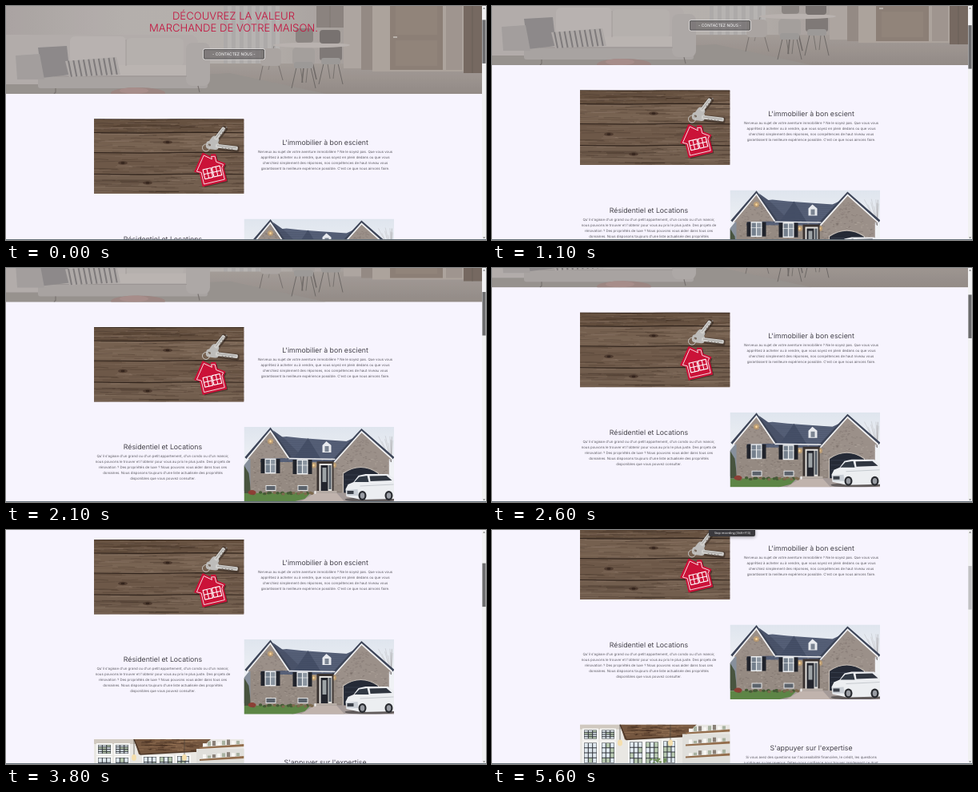
Write an HTML page with a canvas that moves like this. It is 600 by 293 pixels and loops after 5700 ms.

```html
<!DOCTYPE html>
<html lang="fr">
<head>
<meta charset="utf-8">
<title>Immobilier</title>
<style>
html, body { margin: 0; width: 100%; height: 100%; overflow: hidden; background: #f7f4fe; }
canvas { display: block; width: 600px; height: 293px; }
</style>
</head>
<body>
<canvas id="stage" width="600" height="293"></canvas>
<script>
const ctx = document.getElementById('stage').getContext('2d');
const LOOP = 5700, STEP = 100, ZOOM = 0.3125;
const PIC_W = 187.5, PIC_H = 93.5;
const scrollKeys = [[0, 0], [600, 20], [1400, 45.5], [2100, 67.5], [3100, 104],
  [3800, 129.5], [4200, 142.5], [4600, 148]];

let seed = 1;
const rnd = () => (seed = seed * 16807 % 2147483647) / 2147483647;
const gray = (v, warm = 0) => `rgb(${v + warm},${v},${v - warm})`;

function box(color, x, y, w, h) {
  ctx.fillStyle = color;
  ctx.fillRect(x, y, w, h);
}

function trace(pts, closed) {
  ctx.beginPath();
  for (let i = 0; i < pts.length; i += 2) ctx.lineTo(pts[i], pts[i + 1]);
  if (closed) ctx.closePath();
}

function poly(color, ...pts) {
  trace(pts, true);
  ctx.fillStyle = color;
  ctx.fill();
}

function line(color, width, ...pts) {
  trace(pts, false);
  ctx.strokeStyle = color;
  ctx.lineWidth = width;
  ctx.stroke();
}

function oval(color, x, y, rx, ry, tilt = 0) {
  ctx.beginPath();
  ctx.ellipse(x, y, rx, ry, tilt, 0, 7);
  ctx.fillStyle = color;
  ctx.fill();
}

function round(color, x, y, w, h, r) {
  ctx.beginPath();
  ctx.roundRect(x, y, w, h, r);
  ctx.fillStyle = color;
  ctx.fill();
}

function fade(x0, y0, x1, y1, ...colors) {
  const g = ctx.createLinearGradient(x0, y0, x1, y1);
  colors.forEach((c, i) => g.addColorStop(i / (colors.length - 1), c));
  return g;
}

// Font sizes are those of a page 1920 px wide.
function text(str, x, y, size, color, weight = 400, family = 'Inter') {
  ctx.save();
  ctx.translate(x, y);
  ctx.scale(ZOOM, ZOOM);
  ctx.font = `${weight} ${size}px ${family}, sans-serif`;
  ctx.textRendering = 'geometricPrecision';
  ctx.textAlign = 'center';
  ctx.fillStyle = color;
  ctx.fillText(str, 0, 0);
  ctx.restore();
}

function article(x, y, title, lines) {
  text(title, x, y + 3.2, 28, '#45434a');
  lines.forEach((s, i) => text(s, x, y + 13 + i * 7, 14, '#5c5a62'));
}

function picture(x, y, draw) {
  ctx.save();
  ctx.translate(x, y);
  ctx.beginPath();
  ctx.rect(0, 0, PIC_W, PIC_H);
  ctx.clip();
  draw();
  ctx.restore();
}

function chair(x, y, color) {
  const leg = '#6b6764';
  line(leg, 1, x + 5, y + 25, x - 1, y + 51);
  line(leg, 1, x + 23, y + 25, x + 29, y + 51);
  line(leg, 0.8, x + 10, y + 25, x + 13, y + 44);
  line(leg, 0.8, x + 19, y + 25, x + 17, y + 44);
  round(color, x, y, 28, 21, [5, 5, 3, 3]);
  round(gray(158, 2), x + 2, y + 18, 24, 8, 3);
}

function hero() {
  ctx.save();
  ctx.beginPath();
  ctx.rect(0, 0, 595, 110);
  ctx.clip();
  box(fade(0, 0, 595, 0, '#b0aaa8', '#bcb7b4', '#bdb8b4', '#a9a29e', '#a39a94'), 0, 0, 595, 110);
  // Curtains
  for (let i = 0; i < 14; i++) box(gray(i % 2 ? 188 : 178, 2), 272 + i * 5, 0, 5, 74);
  // Floor
  box(fade(0, 68, 0, 110, '#aaa39e', '#968e89'), 0, 72, 595, 38);
  poly('#9b9692', 0, 98, 280, 84, 400, 110, 0, 110);

  // Sofa
  round('#b9b4b2', -10, 36, 250, 62, 10);
  round('#c0bbb8', 80, 38, 70, 40, 6);
  round('#bdb8b5', 150, 40, 72, 36, 6);
  round('#c2bdba', 60, 74, 180, 15, 4);
  round('#aea9a7', 40, 87, 212, 16, 3);
  round('#b4afad', 225, 46, 30, 54, 8);
  line('#9c9795', 0.8, 60, 88, 226, 88);
  line('#a39e9b', 0.8, 150, 42, 150, 75);
  line('#77726f', 1.2, 62, 103, 62, 108, 60, 110);
  line('#77726f', 1.2, 240, 100, 242, 108);
  // Cushions
  poly('#8f8c8d', 40, 52, 76, 50, 80, 86, 45, 90);
  poly('#a8a4a3', 12, 62, 42, 60, 48, 92, 14, 92);
  poly('#b5b0ae', 74, 69, 138, 64, 143, 86, 79, 89);
  for (let i = 0; i < 10; i++) line('#7f7c7d', 2, 78 + i * 6.3, 68.6 - i * 0.45, 82 + i * 6.3, 88.6 - i * 0.3);
  // Coffee table
  oval('#a08884', 165, 109, 34, 7);
  oval('#ad918d', 160, 106, 18, 4);

  // Cupboards and kitchen opening
  box('#8d8580', 388, 0, 34, 27);
  line('#7b7470', 0.8, 405, 0, 405, 27);
  box('#b4aca6', 422, 0, 22, 78);
  box('#978d86', 444, 0, 14, 80);
  // Door
  box('#b3a9a2', 458, 0, 116, 82);
  box('#8e8076', 480, 0, 66, 80);
  box('#94867b', 487, 0, 52, 36);
  box('#94867b', 487, 43, 52, 32);
  box('#c0b9b2', 484, 38, 5, 2);
  box('#a49a93', 550, 0, 20, 80);
  box('#75685f', 572, 0, 23, 84);
  line('#675c54', 1, 583, 0, 583, 84);
  // Dining corner
  line('#6f6a67', 1.6, 376, 40, 370, 96);
  line('#6f6a67', 1.6, 376, 40, 388, 92);
  chair(392, 47, '#7f7a77');
  chair(358, 52, '#aaa5a2');
  round('#8d8784', 362, 28, 22, 18, 4);
  oval('#c1bbb7', 382, 49, 48, 3.2);
  round('#77726f', 392, 30, 26, 17, 4);
  line('#7f7a76', 0.8, 335, 50, 328, 80);
  round('#b0aba7', 318, 53, 26, 22, 5);
  line('#77716e', 1, 321, 75, 317, 93);
  line('#77716e', 1, 341, 75, 346, 93);
  box('rgba(120,116,118,.12)', 0, 0, 595, 110);
  ctx.restore();

  text('DÉCOUVREZ LA VALEUR', 284.5, 16.6, 42, '#c4103c', 300);
  text('MARCHANDE DE VOTRE MAISON.', 284.5, 32.2, 42, '#c4103c', 300);
  round('rgba(90,87,88,.55)', 246.5, 53.7, 77, 13.2, 2);
  ctx.lineWidth = 1;
  ctx.strokeStyle = '#e2dfdf';
  ctx.stroke();
  ctx.beginPath();
  ctx.roundRect(247.4, 54.6, 75.2, 11.4, 1.5);
  ctx.lineWidth = 0.7;
  ctx.strokeStyle = '#444';
  ctx.stroke();
  text('- CONTACTEZ NOUS -', 284.8, 62, 16, '#fff');
}

function keyShape(x, y, angle, length) {
  ctx.save();
  ctx.translate(x, y);
  ctx.rotate(angle);
  round('rgba(35,25,20,.45)', -6, -3, length + 6, 8, 3);
  round('#bdbcba', -8, -5, 16, 10, 4);
  round('#d0cfcc', 4, -2.4, length - 6, 4.8, 1.5);
  for (let i = 0; i < 4; i++) box('#817b76', 12 + i * 4, 1.2, 1.8, 1.6);
  line('#9a9895', 0.8, 6, -0.4, length - 4, -0.4);
  oval('#75675b', -4, 0, 2, 1.6);
  ctx.restore();
}

function keys() {
  seed = 77;
  box('#6f5a4a', 0, 0, PIC_W, PIC_H);
  const seams = [0, 17, 42, 69, 94];
  for (let p = 0; p < 4; p++) {
    const y = seams[p], h = seams[p + 1] - y;
    box(['#665140', '#75604f', '#6d5848', '#725e4e'][p], 0, y, PIC_W, h);
    for (let i = 0; i < 85; i++) {
      const x = rnd() * 200 - 15, gy = y + rnd() * h, w = 12 + rnd() * 55;
      line(rnd() < 0.52 ? 'rgba(45,31,23,.3)' : 'rgba(166,146,128,.27)', 0.35 + rnd() * 0.7,
        x, gy, x + w / 2, gy + rnd() - 0.5, x + w, gy + rnd() * 1.6 - 0.8);
    }
    line('#33261e', 1.1, 0, y, 60, y + 0.6, 130, y - 0.4, PIC_W, y + 0.3);
  }
  for (const [x, y] of [[36, 55], [92, 29], [67, 80]]) {
    oval('rgba(50,33,24,.5)', x, y, 6, 2.2);
    oval('rgba(40,26,20,.7)', x, y, 2.5, 1.2);
  }

  keyShape(149, 29, -0.92, 25);
  keyShape(148, 33, 0.12, 34);
  ctx.beginPath();
  ctx.arc(140, 36, 4.5, 0, 7);
  ctx.strokeStyle = '#c9c8c5';
  ctx.lineWidth = 1;
  ctx.stroke();

  // House tag
  ctx.save();
  ctx.translate(147, 64);
  ctx.rotate(-0.23);
  const tag = [-6, -23, 4, -15, 4, -19, 9, -18, 9, -10, 18, -4, 15, 0, 15, 17, -15, 17, -15, 0, -21, -3];
  ctx.lineJoin = 'round';
  poly('rgba(25,15,10,.45)', ...tag.map((v, i) => v + (i % 2 ? 2 : 1.5)));
  poly('#cb1238', ...tag);
  ctx.lineWidth = 1.4;
  ctx.strokeStyle = '#cb1238';
  ctx.stroke();
  trace(tag.map(v => v * 0.88), true);
  ctx.strokeStyle = '#f5dfe2';
  ctx.lineWidth = 0.9;
  ctx.stroke();
  for (const x of [-10.5, 1]) {
    ctx.strokeStyle = '#fff';
    ctx.lineWidth = 1.1;
    ctx.strokeRect(x, -3, 10, 12);
    line('#fff', 1, x + 5, -3, x + 5, 9);
    line('#fff', 1, x, 3, x + 10, 3);
  }
  ctx.restore();
}

function shutterWindow(x, y) {
  box('#20232b', x - 5, y, 24, 18);
  box('#eceef0', x, y - 0.5, 14, 19);
  box('#747f8c', x + 1.2, y + 1, 5.2, 16);
  box('#8b95a0', x + 7.6, y + 1, 5.2, 16);
  line('#eceef0', 0.7, x, y + 7, x + 14, y + 7);
}

function gable(ax, ay, lx, ly, rx, ry) {
  poly('#9b9089', ax, ay, lx, ly, rx, ry);
  line('#3d4558', 3, lx - 2, ly - 1, ax, ay - 2, rx + 2, ry - 1);
  line('#f0f0f1', 1.7, lx, ly, ax, ay, rx, ry);
}

function house() {
  seed = 31;
  box(fade(0, 0, 0, 50, '#dfe5ee', '#f0f2f5'), 0, 0, PIC_W, PIC_H);
  for (let i = 0; i < 14; i++) {
    const x = 168 + rnd() * 19;
    line('rgba(120,112,112,.45)', 0.4, 184, 44, x, 10 + rnd() * 24);
  }
  poly('#87909c', 0, 48, 8, 38, 20, 44, 20, 80, 0, 80);
  poly('#48543f', 0, 48, 6, 58, 9, 83, 0, 83);
  // Walls and roof
  box('#958a82', 8, 38, 173, 46);
  poly('#566078', 34, 14, 53, 12, 72, 14, 128, 18, 145, 10, 150, 44, 20, 44);
  poly('#4b546b', 36, 4, 50, 14, 76, 40, 54, 40);
  poly('#465068', 80, 14, 96, 40, 62, 40);
  for (let y = 17; y < 40; y += 2.5) line('rgba(38,45,62,.28)', 0.5, 45, y, 134, y + 1);
  gable(33, 5, 4, 40, 56, 39);
  gable(147, 6, 113, 44, 185, 40);
  poly('#9b9089', 116, 43, 181, 40, 181, 72, 116, 72);
  for (let i = 0; i < 420; i++) {
    const x = 9 + rnd() * 171, y = 39 + rnd() * 43;
    box(rnd() < 0.5 ? 'rgba(86,76,72,.28)' : 'rgba(199,188,178,.3)', x, y, 2.2, 0.9);
  }
  for (let i = 0; i < 130; i++) {
    const left = i % 2, y = 15 + rnd() * 25, half = (y - 8) * 0.72;
    box('rgba(86,76,72,.22)', (left ? 32 : 147) + (rnd() * 2 - 1) * half, y, 2, 0.8);
  }
  line('#eff0f2', 1.3, 56, 39.5, 114, 40.5);
  // Dormer
  poly('#e8eaee', 98, 32, 98, 23, 103, 18, 109, 23, 109, 32);
  box('#7b8492', 101, 24, 5, 7);
  // Lights
  for (const [x, y] of [[33, 18], [87, 48], [112, 48]]) {
    oval('rgba(255,190,90,.35)', x, y, 3.6, 3.6);
    oval('#ffd898', x, y, 1.2, 1.6);
  }
  shutterWindow(26, 40);
  shutterWindow(66, 41);
  for (const x of [27, 67]) {
    box('#e3e4e5', x, 73, 13, 7);
    box('#5b626b', x + 1, 74, 11, 5);
  }
  // Door and porch
  box('#3a3331', 91, 43, 21, 37);
  box('#e5e3df', 94, 46, 16, 35);
  box('#23252d', 96, 48, 9, 33);
  box('#9da3a6', 98, 51, 5, 18);
  box('#59616b', 106, 48, 3, 30);
  box('#b7ada6', 88, 80, 28, 3);
  // Garage
  ctx.beginPath();
  ctx.moveTo(124, 84);
  ctx.lineTo(124, 58);
  ctx.quadraticCurveTo(146, 43, 168, 58);
  ctx.lineTo(168, 84);
  ctx.fillStyle = '#252a36';
  ctx.fill();
  ctx.strokeStyle = '#c6beb7';
  ctx.lineWidth = 1.2;
  ctx.stroke();
  for (let i = 0; i < 4; i++) line('#3c4352', 0.7, 126, 60 + i * 6, 166, 60 + i * 6);
  // Ground
  poly('#a49a98', 60, 83, 187.5, 82, 187.5, 94, 60, 94);
  poly('#c0b3ad', 88, 83, 116, 83, 126, 94, 70, 94);
  poly('#5d8546', 0, 83, 84, 82, 76, 90, 60, 94, 0, 94);
  for (let i = 0; i < 26; i++) oval(rnd() < 0.6 ? '#455a36' : '#7d6a4e', 8 + rnd() * 80, 82 + rnd() * 2, 2.2, 1.7);
  oval('#8c3f35', 10, 82, 5, 3);
  oval('#efeeee', 89, 82, 1.2, 2);

  // Car
  oval('rgba(45,42,45,.55)', 158, 91, 32, 3);
  poly('#eceef1', 127, 78, 130, 72, 137, 69, 143, 61, 152, 59, 180, 59, 187.5, 64, 187.5, 90, 146, 91, 128, 87);
  poly('#323a45', 138, 69, 144, 62.5, 154, 61, 156, 69);
  poly('#303640', 158, 68, 157, 61.5, 178, 61, 185, 67);
  poly('#c9ced5', 128, 79, 142, 78, 143, 86, 129, 86);
  box('#3a3f48', 129, 80, 8, 4);
  line('#b5bac1', 0.7, 145, 74, 187, 72);
  for (const x of [148, 181]) {
    oval('#282a2f', x, 86, 5, 6);
    oval('#999ca3', x, 86, 2.8, 3.7);
  }
}

function paneWindow(x, y, w, h) {
  box('#f7f7f5', x - 2, y - 2, w + 4, h + 4);
  box('#30343a', x, y, w, h);
  const pw = w / 3, ph = h / 4;
  for (let i = 0; i < 12; i++) {
    const px = x + (i % 3) * pw, py = y + Math.floor(i / 3) * ph;
    box(rnd() < 0.4 ? '#b8c9b0' : '#dfe8ee', px + 0.5, py + 0.5, pw - 1, ph - 1);
  }
}

function kitchen() {
  seed = 9;
  box('#e9e7e3', 0, 0, PIC_W, PIC_H);
  box('#d0c9c0', 0, 0, 56, 6);
  // Wooden ceiling and wall
  poly('#74563f', 50, 0, 146, 0, 130, 15, 56, 19);
  for (let i = 0; i < 60; i++) {
    box(rnd() < 0.5 ? 'rgba(50,32,20,.4)' : 'rgba(174,137,104,.4)', 54 + rnd() * 72, rnd() * 15, 5 + rnd() * 14, 1);
  }
  line('#4b3627', 1.4, 50, 0, 58, 19, 130, 15);
  paneWindow(5, 7, 16, 11);
  paneWindow(27, 7, 16, 11);
  paneWindow(5, 23, 16, 25);
  paneWindow(27, 23, 16, 25);
  paneWindow(62, 22, 16, 27);
  paneWindow(82, 22, 16, 27);
  paneWindow(104, 21, 15, 27);
  for (const x of [50, 113]) {
    line('#423d38', 0.6, x, 0, x, 20);
    oval('#f5dfae', x, 23, 3, 4);
  }
  // Shelves
  box('#e0dfdb', 128, 12, 60, 82);
  for (let y = 7; y < 50; y += 15) {
    poly('#936d4c', 132, y + 3, PIC_W, y - 1, PIC_W, y + 2, 132, y + 5);
    for (let i = 0; i < 8; i++) {
      const h = 3 + rnd() * 4;
      box(['#f8f7f4', '#a9b2a1', '#8a8178'][i % 3], 136 + i * 6, y + 2 - h - i * 0.4, 4, h);
    }
  }
  for (let i = 0; i < 24; i++) oval('#71905b', 88 + rnd() * 20, 43 + rnd() * 9, 1.7, 1.3);
  box('#f1efec', 0, 52, PIC_W, 42);
}

function scrollbar(offset, held) {
  box('#f1f1f2', 595, 0, 5, 293);
  box(held ? '#6b6b6d' : '#c1c1c3', 595.4, 17.4 + offset * 0.187, 4.2, 54.5);
  poly('#555', 596.2, 3.6, 599, 3.6, 597.6, 2);
  poly('#555', 596.2, 289.4, 599, 289.4, 597.6, 291);
}

function tooltip() {
  ctx.save();
  ctx.shadowColor = 'rgba(0,0,0,.4)';
  ctx.shadowBlur = 4;
  ctx.shadowOffsetY = 1;
  round('#3a393d', 271, -2, 58, 10, 2);
  ctx.restore();
  text('Stop recording (Shift+F10)', 300.5, 4.5, 12, '#fff', 400, '"Open Sans"');
}

function scrollAt(t) {
  const i = scrollKeys.findIndex(k => k[0] > t);
  if (i < 0) return scrollKeys.at(-1)[1];
  const [t0, y0] = scrollKeys[i - 1], [t1, y1] = scrollKeys[i];
  return y0 + (y1 - y0) * (t - t0) / (t1 - t0);
}

function draw(t) {
  const offset = scrollAt(t);
  box('#f7f4fe', 0, 0, 600, 293);
  ctx.save();
  ctx.translate(0, -offset);
  hero();
  picture(110, 141.5, keys);
  picture(297.5, 266.5, house);
  picture(110, 391.5, kitchen);
  article(399, 170.5, "L'immobilier à bon escient", [
    'Nerveux au sujet de votre aventure immobilière ? Ne le soyez pas. Que vous vous',
    'apprêtiez à acheter ou à vendre, que vous soyez en plein dedans ou que vous',
    'cherchiez simplement des réponses, nos compétences de haut niveau vous',
    "garantissent la meilleure expérience possible. C'est ce que nous aimons faire."]);
  article(196, 291.5, 'Résidentiel et Locations', [
    "Qu'il s'agisse d'un grand ou d'un petit appartement, d'un condo ou d'un manoir,",
    "nous pouvons le trouver et l'obtenir pour vous au prix le plus juste. Des projets de",
    'rénovation ? Des propriétés de luxe ? Nous pouvons vous aider dans tous ces',
    "domaines. Nous disposons toujours d'une liste actualisée des propriétés",
    'disponibles que vous pouvez consulter.']);
  article(399, 420.5, "S'appuyer sur l'expertise", [
    "Si vous avez des questions sur l'accessibilité financière, le crédit, les questions",
    'juridiques ou les revenus, faites-nous confiance pour trouver rapidement ce dont']);
  ctx.restore();
  scrollbar(offset, t < 4600);
  box('#66717a', 0, 292, 600, 1);
  if (t >= 4800) tooltip();
}

const start = performance.now();
let shown = -1;
function tick() {
  const t = Math.floor((performance.now() - start) % LOOP / STEP) * STEP;
  if (t !== shown) draw(shown = t);
  requestAnimationFrame(tick);
}
tick();
</script>
</body>
</html>
```
